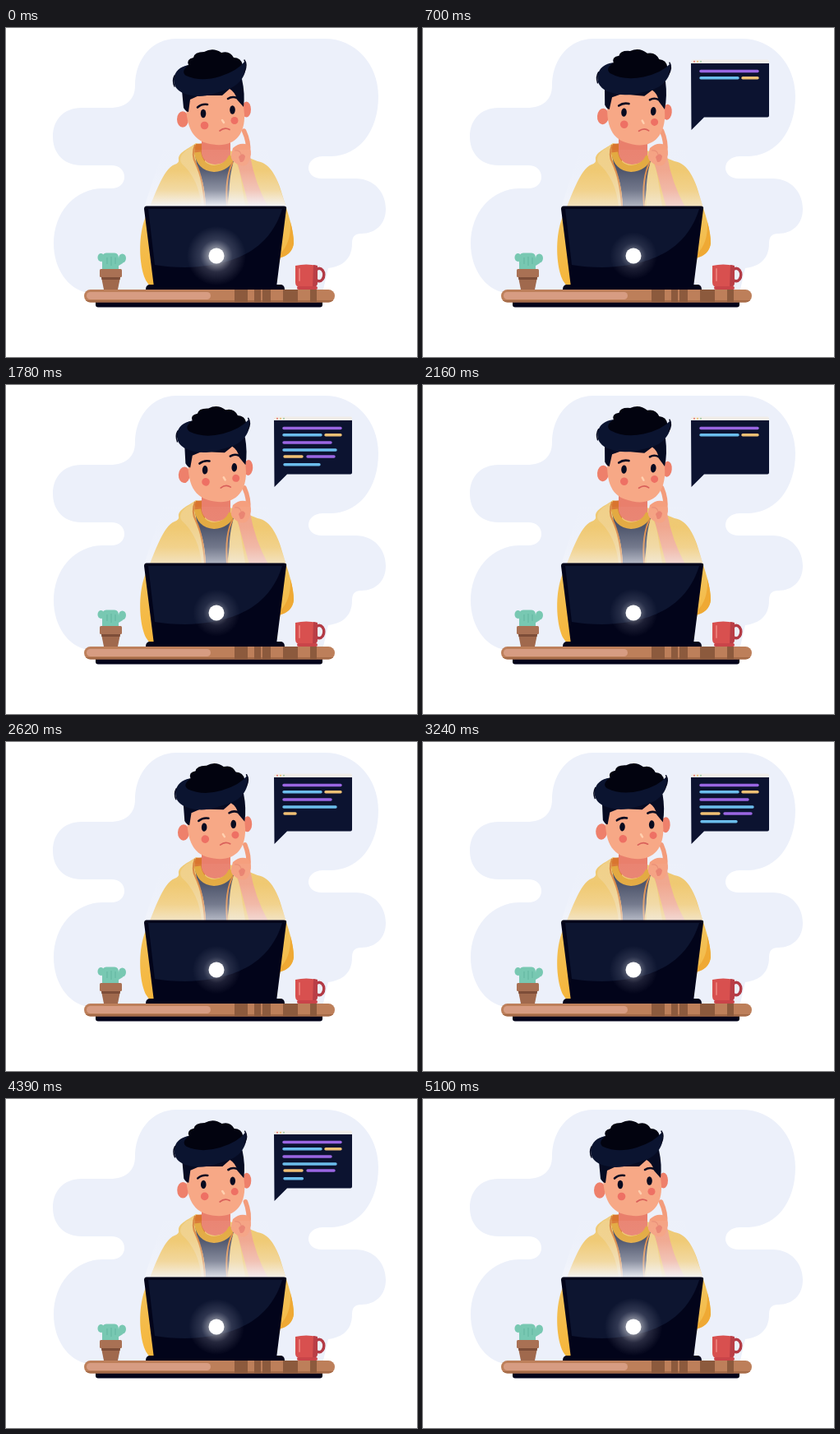
Recreate the animation shown at these times as an HTML page. Size 500x400 px, loop 5170 ms.

```html
<!DOCTYPE html>
<html lang="en">
<head>
<meta charset="utf-8">
<title>Thinking developer</title>
<style>
html, body { margin: 0; width: 100%; height: 100%; overflow: hidden; background: #fff; }
svg { display: block; width: 100%; height: 100%; }
.code path { fill: none; stroke-width: 3.4; stroke-linecap: round; stroke-dasharray: 1 2; }
.ink { fill: none; stroke: #080b20; stroke-linecap: round; }
</style>
</head>
<body>
<svg viewBox="0 0 500 400">
  <defs>
    <linearGradient id="haze" x1="0" y1="0" x2="0" y2="1">
      <stop offset="0" stop-color="#f4f6fc" stop-opacity=".06"/>
      <stop offset=".35" stop-color="#f4f6fc" stop-opacity=".1"/>
      <stop offset=".7" stop-color="#f4f6fc" stop-opacity=".42"/>
      <stop offset="1" stop-color="#f4f6fc"/>
    </linearGradient>
    <radialGradient id="halo">
      <stop offset=".2" stop-color="#fff" stop-opacity=".6"/>
      <stop offset=".55" stop-color="#c8cbe0" stop-opacity=".2"/>
      <stop offset="1" stop-color="#c8cbe0" stop-opacity="0"/>
    </radialGradient>
    <linearGradient id="coat" x1="0" y1="0" x2="0" y2="1">
      <stop offset="0" stop-color="#edc872"/>
      <stop offset=".45" stop-color="#f2c35c"/>
      <stop offset="1" stop-color="#f6b53a"/>
    </linearGradient>
    <clipPath id="wood"><rect x="95" y="318" width="305" height="15.500" rx="7.700"/></clipPath>
  </defs>

  <path fill="#ecf0fa" d="M207 13H388C424 13 453 43 453 83C453 125 430 155 396 156H386C374 156 368 163 368 170S374 183 384 183H425C448 183 462 200 462 220C462 238 450 250 432 250C424 250 421 254 421 262C421 282 408 290 392 292L385 322H100C75 318 58 292 58 262C58 224 84 195 118 195H128C138 195 144 189 144 181S138 167 128 167H92C70 167 57 152 57 132S70 97 92 97H126C146 97 157 87 157 70C157 38 178 13 207 13Z"/>

  <!-- torso -->
  <path fill="url(#coat)" d="M231 140C222 147 209 151 210 160Q211 164 205 166C191 171 180 206 169 232C162 250 161 280 168 302Q172 314 182 317H325L334 278Q348 276 350 262C350 244 343 226 337 206C331 184 323 165 306 162L276 150Z"/>
  <path fill="#efa934" d="M346 236Q347 262 333 275L332 280Q348 276 350 262Q350 250 346 236Z"/>
  <path fill="#434a62" d="M230 154L241 218H269L277 160L253 172Z"/>
  <path fill="#d9752f" d="M231 141Q226 154 235 163L242 168V140Z"/>
  <path fill="#e97f6c" d="M238 132H273V155Q267 166 254 166Q241 165 238 153Z"/>
  <path fill="none" stroke="#e2a638" stroke-width="8" d="M233 151Q236 170 253 171Q269 170 275 156"/>
  <path fill="#f0cf86" d="M230 141C220 148 208 155 214 165Q235 184 238 218H243Q242 184 230 165Q226 154 230 141Z"/>
  <path fill="none" stroke="#d9853f" stroke-width="2" d="M230 142Q225 155 231 165Q240 184 242 217M276 163Q266 182 269 217"/>
  <path fill="#f0cf86" d="M278 160Q270 180 272 217H291L284 172Z"/>

  <!-- raised hand -->
  <path fill="#f0a288" d="M279 155L296 218H319Q303 189 297 156Z"/>
  <path id="finger" fill="none" stroke="#f39c7b" stroke-width="5.500" stroke-linecap="round" d="M294.500 152Q296 139 289.500 125"/>
  <path fill="#f59f7e" d="M276 146Q285 138 294 142Q300 149 297 158Q294 170 285 167Q272 162 274 154Z"/>
  <path fill="#e97f6c" d="M283 157Q288 150 291 156Q290 164 285 163Z"/>
  <path fill="none" stroke="#e98b72" stroke-width="1.200" d="M278 149Q285 148 286 154"/>

  <!-- head -->
  <g id="head">
    <ellipse cx="215" cy="111" rx="7" ry="9.800" fill="#ee806b"/>
    <ellipse cx="292.500" cy="99" rx="5.500" ry="9.500" fill="#ee806b"/>
    <path fill="#f7a886" d="M219 82C218 110 222 134 244 140C274 148 291 133 290 105L286 66L224 72Z"/>
    <path fill="#060b22" d="M214 76L216 97Q219 102 222 102L224 87L235 82H263L272 74Q279 78 281 87L289 96Q291 80 287 62Z"/>
    <path fill="#02030f" d="M207 60Q212 47 222 45Q219 38 228 36Q229 29 241 29Q252 23 262 30Q272 27 277 36Q286 36 288 45L285 60L242 76Z"/>
    <path fill="#0b1430" d="M204 62Q206 48 222 45Q212 53 219 58Q237 66 260 59Q282 52 291 40C295 55 285 70 268 75C252 80 240 86 221 81Q204 77 204 62Z"/>
    <path class="ink" stroke-width="1.500" d="M205 58Q202 64 205 71M290 39Q294 45 290 53"/>
    <g fill="#ee7064">
      <circle cx="241.500" cy="118.500" r="4.800"/>
      <circle cx="278" cy="112.500" r="4.500"/>
    </g>
    <path class="ink" stroke-width="2.600" d="M233 96.500Q238 92 245 93M270 86Q275 82.500 281 85"/>
    <g id="eyesOpen" fill="#080b20">
      <ellipse cx="240" cy="104" rx="3.300" ry="5.200"/>
      <ellipse cx="275.500" cy="99.500" rx="3.300" ry="5.200"/>
    </g>
    <path id="eyesShut" class="ink" stroke-width="1.500" d="M236 105L243 104M272 101L279 100"/>
    <path fill="none" stroke="#ffd0b0" stroke-width="2.500" stroke-linecap="round" d="M263 112L265 115"/>
    <path fill="none" stroke="#d9605a" stroke-width="1.700" stroke-linecap="round" d="M260 125Q266 120 272 123.500"/>
  </g>

  <path id="screenLight" fill="url(#haze)" d="M191 148H317L341 218H168Z"/>

  <!-- desk -->
  <rect x="109" y="330" width="276" height="9.500" rx="3" fill="#02031a"/>
  <g clip-path="url(#wood)">
    <path fill="#bd7f5a" d="M95 318H400V334H95Z"/>
    <path fill="#a56b48" d="M95 331H400V334H95Z"/>
    <rect x="98" y="321" width="151" height="9" rx="4.500" fill="#d79c82"/>
    <path fill="#8c5a3d" d="M278 318h16v16h-16zM302 318h8v16h-8zM312 318h10v16h-10zM337 318h18v16h-18zM370 318h8v16h-8z"/>
  </g>

  <!-- cactus -->
  <g fill="#78c8b2">
    <path d="M117 294V280Q117 273.500 122 273.500H132Q137 273.500 137 280V294Z"/>
    <ellipse cx="115.500" cy="279" rx="4" ry="5"/>
    <ellipse cx="141.500" cy="280" rx="4.500" ry="5.500"/>
    <path d="M116 281H142V286L137 289H118Z"/>
  </g>
  <path fill="none" stroke="#62b5a0" stroke-width="1" d="M123 279V287M128 278V289M133 279V287"/>
  <path fill="#a0694d" d="M116 303H139L136 318H119Z"/>
  <rect x="114" y="293" width="27" height="10" rx="1.500" fill="#a97154"/>
  <path fill="#7d4d38" d="M116 303H139L138.500 306H116.500Z"/>

  <!-- cup -->
  <ellipse cx="381" cy="300" rx="5.800" ry="7.800" fill="none" stroke="#b33b45" stroke-width="3.400"/>
  <path fill="#d8504f" d="M352 289Q365 286 379 289V309Q379 315 373 315H358Q352 315 352 309Z"/>
  <path fill="#b93e46" d="M374 288L379 289V309Q379 315 373 315Z"/>
  <path stroke="#ea7b75" stroke-width="2" stroke-linecap="round" d="M357 293V307"/>
  <rect x="354" y="314" width="25" height="4" rx="2" fill="#c94449"/>

  <!-- laptop -->
  <path fill="#02041a" d="M171 216.500H338Q342 216.500 341 220L329 315H180L168 220Q168 216.500 171 216.500Z"/>
  <path fill="#0d1530" d="M173 220H336C326 252 300 289 218 291Q198 291 181 288Z"/>
  <path fill="#02041a" d="M174 312H335Q339 313 339 318H170Q170 313 174 312Z"/>
  <circle id="glow" cx="256" cy="277" r="36" fill="url(#halo)"/>
  <circle cx="256" cy="277" r="9.500" fill="#fff"/>

  <!-- speech bubble -->
  <g id="bubble">
    <path fill="#0c1330" d="M326 41H421V106.500Q421 108.500 419 108.500H342L326.500 124Z"/>
    <path fill="#f1ede8" d="M326 40.500Q326 38.500 328 38.500H419Q421 38.500 421 40.500V43H326Z"/>
    <circle cx="330" cy="40.800" r="1" fill="#e9776c"/>
    <circle cx="334" cy="40.800" r="1" fill="#edbd68"/>
    <circle cx="338" cy="40.800" r="1" fill="#9ccca5"/>
    <g class="code" id="code"></g>
  </g>
</svg>
<script>
const LOOP = 5170, SWAY = 1420, PEAK = 730;
const $ = id => document.getElementById(id);
const clamp = v => Math.max(0, Math.min(1, v));
const purple = '#9a66e2', blue = '#6bbdec', amber = '#f0c074';

// x1, x2, y, colour, start and duration within its block
const lines = [
  [338, 407, 52.5, purple, 0, 90],
  [338, 383, 60.7, blue, 90, 70],
  [389, 407, 60.7, amber, 160, 40],
  [338, 395, 70, purple, 0, 120],
  [338, 401, 79, blue, 125, 120],
  [339, 360, 87, amber, 250, 50],
  [367, 399, 87, purple, 300, 70],
  [339, 381, 96.7, blue, 375, 110]
];
// from: page cleared, head: first two rows, rest: remaining rows
const pages = [
  { from: 230, head: 470, rest: 740 },
  { from: 1850, head: 1930, rest: 2340 },
  { from: 3470, head: 3785, rest: 3960 }
];

const strokes = lines.map(([x1, x2, y, colour]) => {
  const path = document.createElementNS('http://www.w3.org/2000/svg', 'path');
  path.setAttribute('d', `M${x1} ${y}H${x2}`);
  path.setAttribute('pathLength', 1);
  path.style.stroke = colour;
  return $('code').appendChild(path);
});

const glowKeys = [[0, 1], [230, 1], [700, .64], [1390, .6], [2160, .66], [3240, .66], [3780, .84], [5100, .96], [LOOP, 1]];
function along(keys, t) {
  const i = Math.max(1, keys.findIndex(k => k[0] > t));
  const [t0, a] = keys[i - 1], [t1, b] = keys[i];
  return a + (b - a) * (t - t0) / (t1 - t0);
}

function popScale(t) {
  const p = clamp((t - 200) / 270) - 1;
  return 1 + 1.9 * p ** 3 + .9 * p ** 2;
}

function draw(t) {
  const active = t >= 230 && t < 5100;
  const angle = 2 * Math.PI * (t - PEAK) / SWAY;
  const sway = active ? (1 + Math.cos(angle)) / 2 : 0;
  $('head').setAttribute('transform', `rotate(${5 * sway} 258 155)`);

  const beat = active ? (t - 1400 + SWAY) % SWAY : SWAY / 2;
  const gap = Math.min(beat, SWAY - beat);
  const shut = t > 1000 && gap < 75;
  $('eyesOpen').style.display = shut ? 'none' : '';
  $('eyesShut').style.display = shut ? '' : 'none';
  const tap = active && t > 1000 ? clamp(1 - gap / 260) : 0;
  $('finger').setAttribute('transform', `rotate(${2 * sway + 9 * tap} 294 153)`);

  const light = along(glowKeys, t);
  $('screenLight').style.opacity = light;
  $('glow').style.opacity = light;
  $('glow').setAttribute('r', 16 + 20 * light);

  $('bubble').style.display = active ? '' : 'none';
  $('bubble').setAttribute('transform', `translate(327 124) scale(${popScale(t)}) translate(-327 -124)`);
  const page = pages.filter(p => t >= p.from).pop() || pages[0];
  strokes.forEach((path, i) => {
    const start = (i < 3 ? page.head : page.rest) + lines[i][4];
    const done = clamp((t - start) / lines[i][5]);
    path.style.display = done > 0 ? '' : 'none';
    path.style.strokeDashoffset = 1 - done;
  });
}

const begin = performance.now();
function tick() {
  draw((performance.now() - begin) % LOOP);
  requestAnimationFrame(tick);
}
tick();
</script>
</body>
</html>
```
